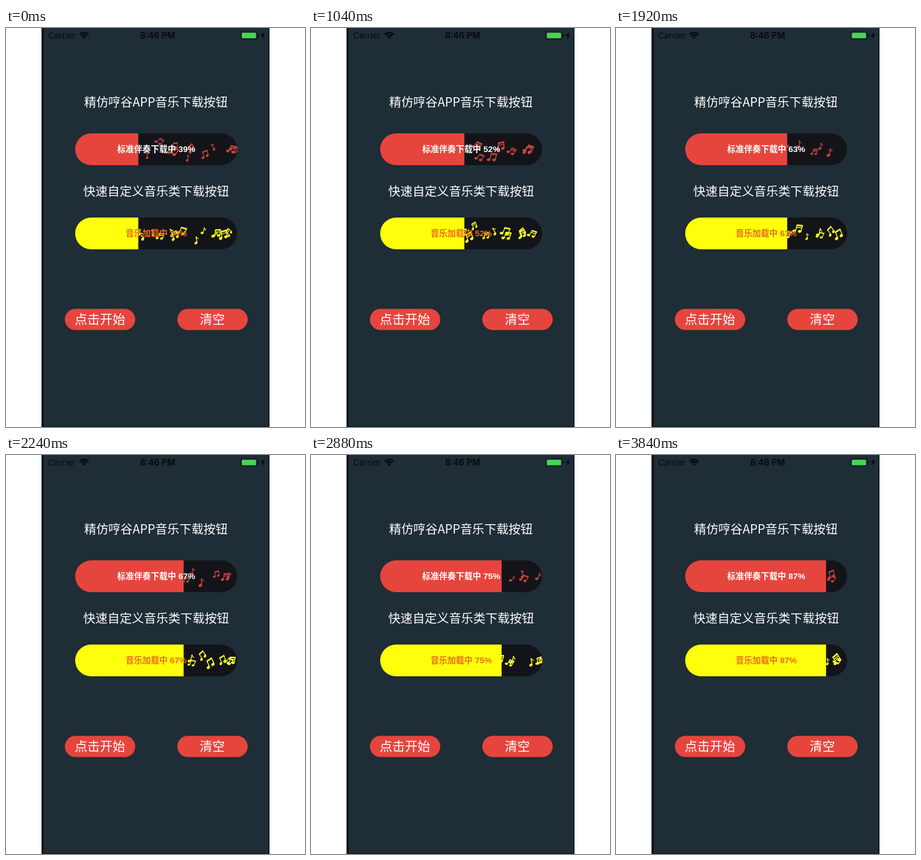
Recreate the animation shown at these times as an HTML page with a canvas. Size 480 px wide and 640 px high, loop 3.92 s.

```html
<!DOCTYPE html>
<html lang="zh">
<head>
<meta charset="utf-8">
<style>
html, body { margin: 0; width: 100%; height: 100%; overflow: hidden; background: #fff; }
canvas { display: block; width: 480px; height: 640px; }
</style>
</head>
<body>
<canvas id="stage" width="480" height="640"></canvas>
<script>
const ctx = document.getElementById('stage').getContext('2d');
const STEP = 80, STEPS = 49, LOOP = STEP * STEPS;
const SPEED = 0.092, SOURCE_X = 367, FIRST_LAUNCH = -1700;
const RED = '#e6453e', DARK = '#131419', BLACK = '#05090c';
const CJK = '"Noto Sans CJK SC", sans-serif';
const LABEL = '"Liberation Sans", ' + CJK;

const bars = [
  { y: 169, fill: RED, noteColor: '#cf443c', ink: '#fff', label: '标准伴奏下载中',
    notes: makeNotes(3, 175, 17) },
  { y: 304, fill: '#ffff0c', noteColor: '#f8f82a', ink: '#ee6d18', label: '音乐加载中',
    notes: makeNotes(8, 140, 13) }
];

function seededRandom(seed) {
  let state = seed * 7919;
  return () => {
    state = (state * 16807 + 11) % 2147483647;
    return state / 2147483647;
  };
}

// Notes leave the right end at a jittered interval and drift to alternating sides.
function makeNotes(seed, interval, spread) {
  const random = seededRandom(seed);
  const notes = [];
  for (let base = FIRST_LAUNCH; base < LOOP; base += interval) {
    const side = notes.length % 2 ? 1 : -1;
    notes.push({
      launch: base + (random() - 0.5) * interval * 1.4,
      drift: side * spread * random(),
      tilt: (random() - 0.5) * 1.2,
      size: 0.75 + 0.3 * random(),
      kind: Math.floor(random() * 3)
    });
  }
  return notes;
}

function rect(x, y, w, h, color) {
  ctx.fillStyle = color;
  ctx.fillRect(x, y, w, h);
}

function pill(x, y, w, h, color, radius = h / 2) {
  ctx.fillStyle = color;
  ctx.beginPath();
  ctx.roundRect(x, y, w, h, radius);
  ctx.fill();
}

function text(value, x, baseline, font, color, align = 'center') {
  ctx.font = font;
  ctx.fillStyle = color;
  ctx.textAlign = align;
  ctx.fillText(value, x, baseline);
}

function polygon(points, color) {
  ctx.fillStyle = color;
  ctx.beginPath();
  points.forEach(([x, y]) => ctx.lineTo(x, y));
  ctx.fill();
}

function stem(x, bottom, top) {
  ctx.beginPath();
  ctx.moveTo(x, bottom);
  ctx.lineTo(x, top);
  ctx.stroke();
}

function noteHead(x, y) {
  ctx.beginPath();
  ctx.ellipse(x, y, 2.8, 2.2, -0.4, 0, Math.PI * 2);
  ctx.fill();
}

function drawGlyph(kind, color) {
  ctx.fillStyle = ctx.strokeStyle = color;
  ctx.lineWidth = 1.4;
  if (kind === 0) {
    noteHead(-1.5, 5);
    stem(0.6, 5, -6);
    ctx.beginPath();
    ctx.moveTo(0.6, -6);
    ctx.quadraticCurveTo(1.5, -3, 4.5, -1.5);
    ctx.stroke();
    return;
  }
  noteHead(-5, 5.5);
  noteHead(3.5, 4);
  stem(-3, 5, -5);
  stem(5.4, 3.5, -6.5);
  polygon([[-3.7, -5.5], [6.1, -7], [6.1, -4.4], [-3.7, -2.9]], color);
  if (kind === 2) {
    ctx.beginPath();
    ctx.moveTo(-3, -0.8);
    ctx.lineTo(5.4, -2.2);
    ctx.stroke();
  }
}

function drawNotes(bar, edge, t) {
  ctx.save();
  ctx.beginPath();
  ctx.rect(edge, bar.y, 372 - edge, 51);
  ctx.clip();
  for (const { launch, drift, tilt, size, kind } of bar.notes) {
    const distance = (t - launch) * SPEED;
    const x = SOURCE_X - distance;
    if (distance < 0 || x < edge - 10) continue;
    const phase = Math.PI * distance / 200;
    ctx.save();
    ctx.translate(x, bar.y + 25.5 + drift * Math.sin(phase));
    ctx.rotate(tilt + drift * 0.03 * Math.cos(phase));
    ctx.scale(size, size);
    drawGlyph(kind, bar.noteColor);
    ctx.restore();
  }
  ctx.restore();
}

function drawBar(bar, percent, t) {
  const edge = 111 + 2.6 * percent;
  pill(111, bar.y, 260, 51, DARK);
  drawNotes(bar, edge, t);
  ctx.save();
  ctx.beginPath();
  ctx.rect(111, bar.y, edge - 111, 51);
  ctx.clip();
  pill(111, bar.y, 260, 51, bar.fill);
  ctx.restore();
  text(`${bar.label} ${percent}%`, 241.2, bar.y + 30, `bold 13.5px ${LABEL}`, bar.ink);
}

function drawStatus() {
  text('Carrier', 67.5, 17, '13.5px Inter, sans-serif', BLACK, 'left');
  text('8:46 PM', 243.3, 17, '600 13.8px Inter, sans-serif', BLACK);

  ctx.strokeStyle = BLACK;
  ctx.lineWidth = 2.4;
  for (const radius of [6.3, 9.9]) {
    ctx.beginPath();
    ctx.arc(125.5, 17, radius, -Math.PI * 0.76, -Math.PI * 0.24);
    ctx.stroke();
  }
  ctx.fillStyle = BLACK;
  ctx.beginPath();
  ctx.moveTo(125.5, 17.6);
  ctx.arc(125.5, 17, 3.6, -Math.PI * 0.76, -Math.PI * 0.24);
  ctx.fill();

  pill(376.5, 5.5, 27, 13, '#111c24', 3);
  pill(378.5, 7.5, 23, 9, '#45d654', 1.5);
  pill(404.2, 10, 1.6, 4, BLACK, 0.8);
  polygon([[414, 6.5], [409, 12.6], [412, 12.6], [411, 17.5], [416, 11], [413, 11]], BLACK);
}

function drawScreen() {
  rect(0, 0, 480, 640, '#fff');
  rect(57, 0, 366, 640, '#1f2d36');
  rect(57, 0, 3.5, 640, '#08121a');
  rect(421.8, 0, 1.2, 640, '#0b151c');
  rect(57, 638.8, 366, 1.2, '#0b151c');
  drawStatus();
  text('精仿哼谷APP音乐下载按钮', 240.7, 125.5, `19.4px ${CJK}`, '#fff');
  text('快速自定义音乐类下载按钮', 241, 269, `19.5px ${CJK}`, '#fff');
  for (const [x, label] of [[94.5, '点击开始'], [275, '清空']]) {
    pill(x, 450.5, 113, 34, RED);
    text(label, x + 56.3, 475, `20.3px ${CJK}`, '#fff');
  }
}

function render(now) {
  const step = Math.floor(now / STEP) % STEPS;
  drawScreen();
  bars.forEach(bar => drawBar(bar, 39 + step, step * STEP));
}

const start = performance.now();
function tick() {
  render(performance.now() - start);
  requestAnimationFrame(tick);
}
tick();
</script>
</body>
</html>
```
